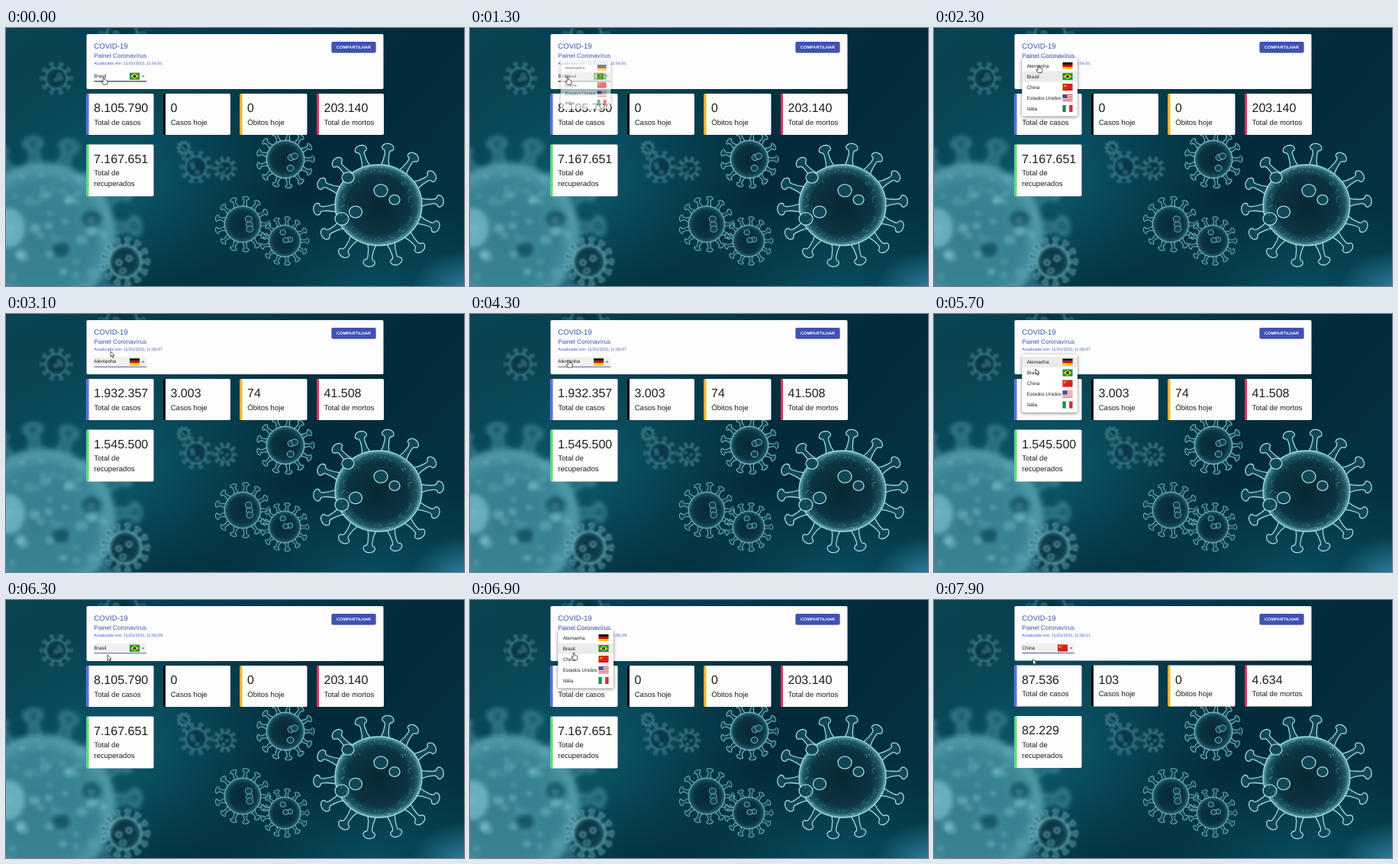
Recreate the animation shown at these times as an HTML page. Size 600x338 px, loop 8 s.

```html
<!DOCTYPE html>
<html lang="pt-BR">
<head>
<meta charset="utf-8">
<title>Painel</title>
<style>
html, body { margin: 0; width: 100%; height: 100%; overflow: hidden; background: #06323f; }
svg { display: block; width: 100%; height: 100%; }
text { font-family: "Liberation Sans", Arial, sans-serif; white-space: pre; text-rendering: geometricPrecision; }
.card { filter: drop-shadow(0 .5px .6px rgba(0,0,0,.3)); }
</style>
</head>
<body>
<svg viewBox="0 0 600 338" preserveAspectRatio="none">
  <defs>
    <linearGradient id="sea" x1="0" y1="0" x2="1" y2=".5">
      <stop offset="0" stop-color="#0a4453"/>
      <stop offset=".45" stop-color="#06394a"/>
      <stop offset=".75" stop-color="#032a39"/>
      <stop offset="1" stop-color="#033141"/>
    </linearGradient>
    <radialGradient id="glow">
      <stop offset="0" stop-color="#127a8c" stop-opacity=".75"/>
      <stop offset="1" stop-color="#0b6172" stop-opacity="0"/>
    </radialGradient>
    <radialGradient id="corner">
      <stop offset="0" stop-color="#3d93b4"/>
      <stop offset="1" stop-color="#3d93b4" stop-opacity="0"/>
    </radialGradient>
    <radialGradient id="shell">
      <stop offset="0" stop-color="#092733"/>
      <stop offset=".72" stop-color="#0c3441"/>
      <stop offset=".9" stop-color="#1d5764"/>
      <stop offset="1" stop-color="#66adb6"/>
    </radialGradient>
    <radialGradient id="haze">
      <stop offset="0" stop-color="#3c8797"/>
      <stop offset=".75" stop-color="#3f8d9d"/>
      <stop offset="1" stop-color="#5fa9b8"/>
    </radialGradient>
  </defs>
  <g id="back"></g>
  <g id="page"></g>
</svg>
<script>
const LOOP = 8000;
const $ = id => document.getElementById(id);
const clamp = v => Math.max(0, Math.min(1, v));
const ease = v => v * v * (3 - 2 * v);
const times = (n, f) => Array.from({ length: n }, (_, i) => f(i)).join('');

const rect = (x, y, w, h, fill, extra = '') =>
  `<rect x="${x}" y="${y}" width="${w}" height="${h}" fill="${fill}" ${extra}/>`;
const text = (x, y, size, str, fill = '#1f1f1f', extra = '') =>
  `<text x="${x}" y="${y}" font-size="${size}" fill="${fill}" ${extra}>${str}</text>`;
const oval = (x, y, rx, ry, extra = '') =>
  `<ellipse cx="${x}" cy="${y}" rx="${rx}" ry="${ry}" ${extra}/>`;

// ---- Background ----
let seed = 11;
const rnd = () => (seed = (seed * 16807) % 2147483647) / 2147483647;

// A random point in a disc of radius r, no nearer than the given share of it
function scatter(x, y, r, inner = 0) {
  const a = rnd() * Math.PI * 2, d = r * Math.sqrt(inner * inner + rnd() * (1 - inner * inner));
  return [x + Math.cos(a) * d, y + Math.sin(a) * d];
}

// A club: wide foot, thin neck, rounded head
function spike(x, y, deg, len, cap) {
  const neck = cap * .36, foot = cap * .7;
  const side = s => `${len * .3} ${s * neck} ${len * .6} ${s * neck}`;
  return `<path transform="translate(${x} ${y}) rotate(${deg})" d="M0 ${-foot}Q${side(-1)}` +
    `Q${len * .8} ${-neck} ${len * .8} ${-cap * .8}C${len * .9} ${-cap * 1.2} ${len * 1.1} ${-cap * .8} ${len * 1.1} 0` +
    `S${len * .9} ${cap * 1.2} ${len * .8} ${cap * .8}Q${len * .8} ${neck} ${len * .6} ${neck}` +
    `Q${len * .3} ${neck} 0 ${foot}"/>`;
}

function virus(x, y, r, o = {}) {
  const { n = 13, ry = r, turn = 0, reach = .5, cap = r * .19, blur = .6, alpha = .8, w = 1 } = o;
  const bumps = o.bumps || Array.from({ length: 3 }, () => [...scatter(x, y, r * .6), r * .18]);
  return `<g style="filter:blur(${blur}px)" opacity="${alpha}" stroke-width="${w}" ` +
    `fill="${o.arm || '#104656'}" stroke="${o.line || '#8ed0d6'}">` +
    times(n, i => {
      const deg = turn + i * 360 / n, a = deg * Math.PI / 180;
      return spike(x + Math.cos(a) * r * .97, y + Math.sin(a) * ry * .97, deg, r * reach, cap);
    }) +
    oval(x, y, r, ry, `fill="url(#${o.fill || 'shell'})"`) +
    bumps.map(([a, b, s]) => oval(a, b, s, s * .9)).join('') + '</g>';
}

// Short bright wrinkles along the rim
function folds(x, y, r) {
  const d = times(90, () => `M${scatter(x, y, r, .75)}q${rnd() * 8 - 4} ${rnd() * 6 - 3} ${rnd() * 10 - 5} ${rnd() * 8 - 4}`);
  return `<path d="${d}" fill="none" stroke="#8fcdd2" stroke-width=".7" opacity=".4"/>`;
}

function specks(x, y, r) {
  return '<g fill="#9ad3dd" style="filter:blur(2.5px)">' + times(55, () => {
    const [a, b] = scatter(x, y, r), k = 3 + rnd() * 5;
    return oval(a, b, k, k * .8, `opacity="${.1 + rnd() * .3}"`);
  }) + '</g>';
}

function backdrop() {
  const far = { blur: 1.1, alpha: .55, n: 10 };
  return rect(0, 0, 600, 338, 'url(#sea)') +
    oval(150, 200, 240, 190, 'fill="url(#glow)" opacity=".7"') +
    oval(480, 340, 270, 130, 'fill="url(#glow)" opacity=".5"') +
    oval(605, 345, 75, 55, 'fill="url(#corner)" opacity=".8"') +
    virus(66, 66, 14, far) + virus(152, 8, 20, far) +
    virus(233, 157, 6, far) + virus(249, 182, 14, far) + virus(287, 184, 10, far) +
    virus(310, 257, 24) + virus(365, 279, 21) +
    virus(366, 172, 25, { blur: .4, alpha: .9 }) +
    virus(48, 272, 94, {
      n: 16, turn: -6, reach: .36, cap: 12, w: 4, blur: 3.5, alpha: .88,
      arm: '#17596a', line: '#4f9cac', fill: 'haze', bumps: [[112, 250, 15], [72, 290, 14]]
    }) +
    specks(48, 272, 90) +
    oval(3, 262, 22, 26, 'fill="#7cc0ce" opacity=".7" style="filter:blur(3px)"') +
    virus(156, 306, 21, { blur: 1.5, w: 1.4 }) +
    virus(488, 232, 57, {
      n: 14, ry: 53, turn: -4, reach: .48, cap: 8, w: 1.3, blur: .3, alpha: 1, line: '#9fdade',
      bumps: [[491, 213, 9], [509, 225, 7], [458, 241, 8.5], [440, 250, 9], [448, 196, 8]]
    }) +
    folds(488, 232, 54);
}

// ---- Flags, 13 x 9 ----
const bands = (cols, upright) => cols.map((c, i) => upright
  ? rect(i * 13 / 3, 0, 13 / 3, 9, c) : rect(0, i * 9 / cols.length, 13, 9 / cols.length, c)).join('');
const FLAGS = [
  bands(['#111', '#d00', '#fc0']),
  rect(0, 0, 13, 9, '#109a3c') + '<path d="M6.5 .9L12 4.5 6.5 8.1 1 4.5Z" fill="#fd0"/>' + oval(6.5, 4.5, 2, 2, 'fill="#1b2f78"'),
  rect(0, 0, 13, 9, '#d8201b') +
    '<path d="M2.6 1l.5 1.3h1.3l-1 .8.4 1.3-1.2-.8-1.2.8.4-1.3-1-.8h1.3Z" fill="#fd0"/>' +
    times(4, i => oval(4.4 + 1.7 * Math.sin((i + .5) * Math.PI / 4), 1 + i * 1.1, .4, .4, 'fill="#fd0"')),
  bands(Array.from({ length: 9 }, (_, i) => i % 2 ? '#fff' : '#d0404c')) + rect(0, 0, 6, 5, '#45508c'),
  bands(['#109048', '#fff', '#d62a35'], true)
];
const flag = (i, x, y) => `<g transform="translate(${x} ${y})">${FLAGS[i]}` +
  rect(0, 0, 13, 9, 'none', 'stroke="#000" stroke-opacity=".15" stroke-width=".4"') + '</g>';

// ---- Content and timeline ----
const NAMES = ['Alemanha', 'Brasil', 'China', 'Estados Unidos', 'Itália'];
const LABELS = ['Total de casos', 'Casos hoje', 'Óbitos hoje', 'Total de mortos', 'Total de'];
const COLORS = ['#5a66f2', '#000', '#eebb1c', '#cf3568', '#5fdc6c'];
const DATA = [
  ['1.932.357', '3.003', '74', '41.508', '1.545.500'],
  ['8.105.790', '0', '0', '203.140', '7.167.651'],
  ['87.536', '103', '0', '4.634', '82.229']
];
const LIFT = [1, 0, .5];

// Each visit opens the menu, picks a country and then loads its numbers
const visits = [
  { open: -LOOP, pick: -LOOP, load: -LOOP, i: 1, at: '11:54:01' },
  { open: 1150, pick: 2600, load: 2900, i: 0, at: '11:56:07' },
  { open: 4750, pick: 5700, load: 5900, i: 1, at: '11:56:09' },
  { open: 6500, pick: 7200, load: 7500, i: 2, at: '11:56:11' }
];
const latest = (key, t) => visits.filter(v => v[key] <= t).pop();

// Pointer glides: from, to, x, y
const glides = [
  [1600, 2300, 137, 49], [3300, 3400, 129.5, 60.5], [4900, 5200, 133, 72],
  [6300, 6500, 131, 65], [6600, 6900, 136, 69], [6900, 7100, 137, 76], [7400, 7800, 129.5, 77.5]
];

function pointer(t) {
  let x = 128, y = 64.5;
  for (const [from, to, gx, gy] of glides) {
    const p = ease(clamp((t - from) / (to - from)));
    x += (gx - x) * p;
    y += (gy - y) * p;
  }
  return [x, y];
}

function header(t, at, pick, lift) {
  const blue = '#3f51b5', focus = t >= visits[1].pick, y = 57 - lift / 2;
  return rect(105.5, 8, 389, 72 - lift, '#fdfdfe', 'rx="1.8" class="card"') +
    text(115.3, 27.3, 9.6, 'COVID-19', blue) +
    text(115.3, 39.3, 8.1, 'Painel Coronavírus', blue) +
    text(115.3, 48.3, 5.25, 'Atualizado em: 11/01/2021 ' + at, blue, 'letter-spacing=".19"') +
    rect(426.5, 18, 58, 14.5, blue, 'rx="1.8" class="card"') +
    text(433, 27.1, 5.4, 'COMPARTILHAR', '#fff', 'font-weight="bold" letter-spacing=".15"') +
    (focus ? rect(115.3, y, 68.7, 13, '#f0f0f0') : '') +
    rect(115.3, y + 12.3, 68.7, focus ? .9 : 1.2, focus ? '#44509a' : '#333') +
    text(115.3, y + 7.8, 6.4, NAMES[pick]) +
    flag(pick, 162, y + 1.7) +
    `<path d="M177.5 ${y + 5.5}h4l-2 2.1Z" fill="#666"/>`;
}

function cards(i, lift) {
  const s = DATA[i].map((v, k) => {
    const tall = k === 4, x = 105.5 + (k % 4) * 100.5, y = tall ? 152.5 : 86, h = tall ? 68 : 54;
    return rect(x, y, 88, h, '#fdfdfe', 'rx="1.8" class="card"') +
      `<path d="M${x + 3} ${y}h-1.6q-1.4 0-1.4 1.4v${h - 2.8}q0 1.4 1.4 1.4h1.6Z" fill="${COLORS[k]}"/>` +
      text(x + 9.5, y + 24.2, 16, v) + text(x + 9.7, y + 40.8, 9.6, LABELS[k]) +
      (tall ? text(x + 9.7, y + 54.8, 9.6, 'recuperados') : '');
  }).join('');
  return `<g transform="translate(0 ${-lift})">${s}</g>`;
}

function menu(t, { open, pick }, sel) {
  const p = ease(clamp((t - open) / 260)) * (1 - ease(clamp((t - pick) / 260)));
  if (p <= 0) return '';
  const mid = 63 + sel / 2, top = mid - sel * 14 - 10, k = .75 + .25 * p;
  const rows = NAMES.map((n, i) => {
    const y = mid + (i - sel) * 14;
    return (i === sel ? rect(115.3, y - 7, 72.7, 14, '#ebebeb') : '') +
      text(121.7, y + 2.2, 6.4, n) + flag(i, 168.5, y - 4.5);
  }).join('');
  return `<g opacity="${p}" transform="translate(151 ${mid}) scale(${k} ${k * k}) translate(-151 ${-mid})">` +
    rect(115.3, top, 72.7, 76, '#fff', 'rx="1.8" style="filter:drop-shadow(0 1.6px 2.2px rgba(0,0,0,.5))"') + rows + '</g>';
}

const HAND = 'M-.9 .6Q0-.6 .9 .6V3.4Q1.8 2.8 2.4 3.7 3.3 3.3 3.8 4.2 5 4 4.9 5.4V7.4L4.1 9.6H-.7L-3 6.5Q-3.2 5 -1.9 5.4L-.9 6.2Z';
const ARROW = 'M0 0V7.2L1.7 5.7 2.9 8.3 4 7.8 2.9 5.3H5.1Z';

function render(t) {
  const pick = latest('pick', t).i, load = latest('load', t), lift = LIFT[load.i];
  const [x, y] = pointer(t);
  const onMenu = visits.some(v => t >= v.open && t < v.pick);
  const shape = onMenu || (y >= 57 && y <= 70) ? HAND : ARROW;
  $('page').innerHTML = header(t, load.at, pick, lift) + cards(load.i, lift) +
    visits.slice(1).map((v, k) => menu(t, v, visits[k].i)).join('') +
    `<path transform="translate(${x} ${y})" d="${shape}" fill="#fff" stroke="#222" stroke-width=".75" stroke-linejoin="round"/>`;
}

$('back').innerHTML = backdrop();
let last = -1;
function tick() {
  const t = Math.floor(performance.now() % LOOP / 100) * 100;
  if (t !== last) render(last = t);
  requestAnimationFrame(tick);
}
tick();
</script>
</body>
</html>
```
